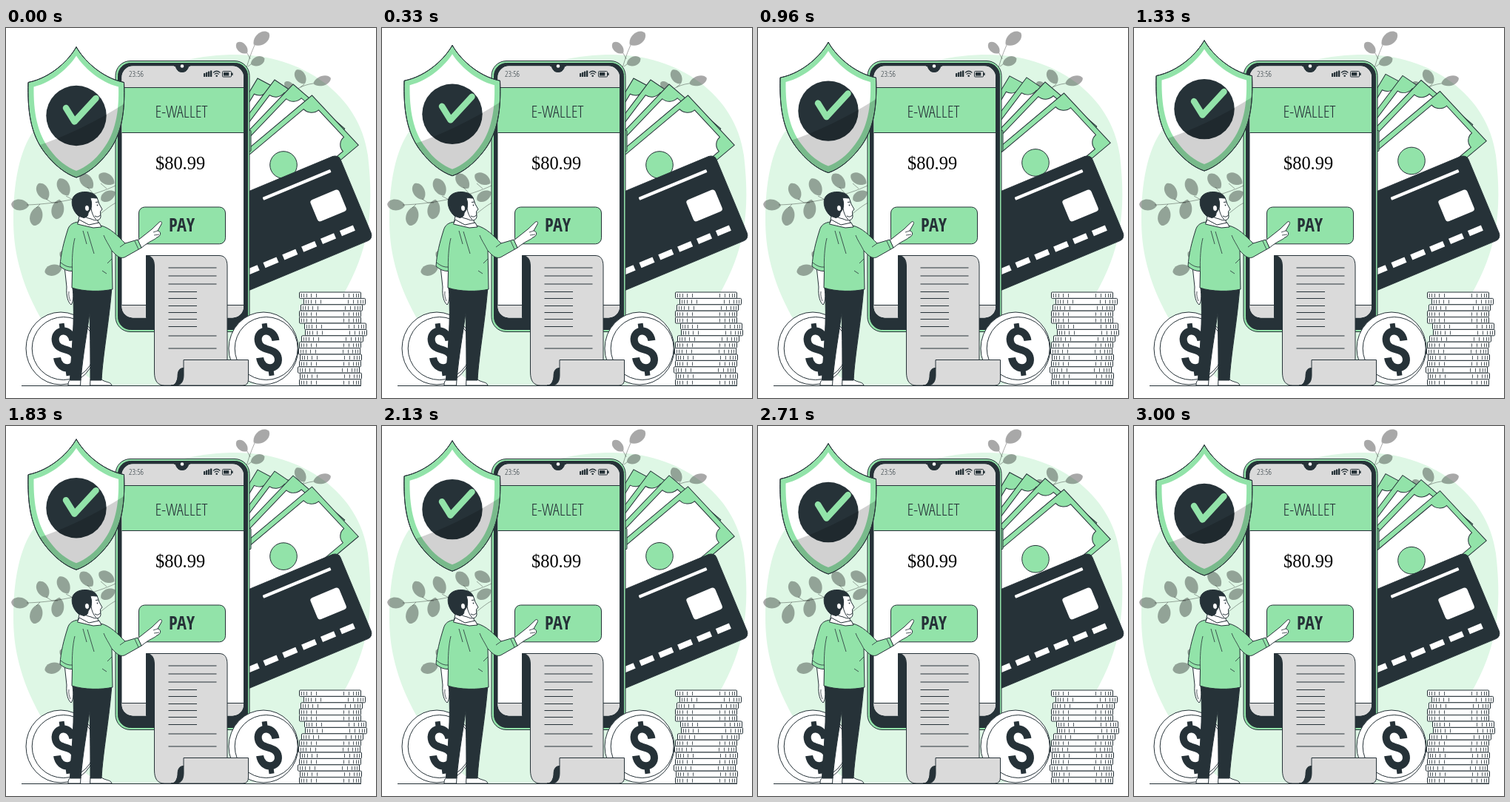
These frames come from a looping animation (500x500 px, 3.04 s). An HTML page with a canvas:

```html
<!DOCTYPE html>
<html lang="en">
<head>
<meta charset="utf-8">
<title>E-Wallet</title>
<style>
html, body { margin: 0; width: 100%; height: 100%; overflow: hidden; background: #fff; }
canvas { display: block; width: 500px; height: 500px; }
</style>
</head>
<body>
<canvas id="stage"></canvas>
<script>
const INK = '#263238', GREEN = '#92e3a9', GRAY = '#dadada', WHITE = '#fff';
const LEAF = 'rgba(0,0,0,.34)';
const LOOP = 3040, FPS = 24;
const LIGHT = "'Open Sans Condensed Light', 'Open Sans Cond Light', 'Open Sans', 'Roboto Condensed', sans-serif";
const BOLD = "'Open Sans Condensed', 'Open Sans', 'Roboto Condensed', sans-serif";
const canvas = document.getElementById('stage');
const ratio = window.devicePixelRatio || 1;
canvas.width = canvas.height = 500 * ratio;
const c = canvas.getContext('2d');

function paint(p, fill, stroke, width = 1) {
  if (fill) { c.fillStyle = fill; c.fill(p); }
  if (stroke) { c.strokeStyle = stroke; c.lineWidth = width; c.stroke(p); }
}
function path(d, fill, stroke = INK, width = 1) {
  paint(new Path2D(d), fill, stroke, width);
}
function line(d, width = 1, color = INK) { path(d, null, color, width); }
function box(x, y, w, h, r, fill, stroke, width) {
  const p = new Path2D();
  p.roundRect(x, y, w, h, r);
  paint(p, fill, stroke, width);
}
function oval(x, y, rx, ry, fill, stroke, turn = 0) {
  const p = new Path2D();
  p.ellipse(x, y, rx, ry, turn, 0, 7);
  paint(p, fill, stroke);
}
function group(x, y, turn, body) {
  c.save();
  c.translate(x, y);
  c.rotate(turn);
  body();
  c.restore();
}
// Picks a smaller size when the face is wider than the room for it.
function label(s, x, y, face, weight, size, room) {
  const set = n => { c.font = `${weight} condensed ${n}px ${face}`; };
  set(size);
  const w = c.measureText(s).width;
  if (w > room) set(size * room / w);
  c.textAlign = 'center';
  c.fillStyle = INK;
  c.fillText(s, x, y);
}

function leaf(x, y, len, deg, wide = .62) {
  group(x, y, deg * Math.PI / 180, () => {
    const a = len / 2, b = a * wide * 1.33;
    path(`M${-a} 0C${-a * .6} ${-b} ${a * .8} ${-b} ${a} 0C${a * .8} ${b} ${-a * .6} ${b} ${-a} 0Z`, LEAF, null);
  });
}

function backdrop() {
  path('M10 258C10 210 18 165 38 138C75 105 130 95 170 75C215 45 265 36 311 36C400 36 478 90 489 172' +
    'C498 250 490 300 455 362C430 405 400 440 360 470Q345 483 330 483H130C90 465 45 400 25 345C13 310 10 285 10 258Z',
    '#def7e5', null);
  line('M150 212C120 227 70 238 28 239M41 243L46 238M70 236L62 236M54 231L62 236M81 227L90 232M110 215L118 224' +
    'M128 210L136 217M118 258C130 250 140 240 149 236M73 323C82 316 88 310 92 303', 1, LEAF);
  leaf(19, 239, 24, 185);
  leaf(41, 254, 27, 105);
  leaf(50, 221, 25, 240);
  leaf(70, 245, 27, 100);
  leaf(78, 215, 26, 242);
  leaf(109, 207, 25, 230);
  leaf(136, 204, 24, 210);
  leaf(104, 241, 25, 95);
  leaf(138, 227, 22, 150);
  leaf(64, 327, 24, 165);
  leaf(82, 309, 22, 215);
  line('M322 64C326 50 330 36 336 23M326 34L330 42M331 49L327 52M378 96C388 84 400 77 415 75M403 76L398 80', 1, LEAF);
  leaf(345, 14.5, 26, -38);
  leaf(319, 27, 20, 225);
  leaf(340, 45, 20, -22);
  leaf(398, 66, 22, 238);
  leaf(427, 71.5, 25, -18, .52);
  leaf(383, 78, 16, 215);
}

function note(x, y, deg) {
  const a = deg * Math.PI / 180, b = a + 93 * Math.PI / 180;
  c.save();
  c.transform(Math.cos(a), Math.sin(a), Math.cos(b), Math.sin(b), x, y);
  path('M0 0H92V200H0Z', GREEN);
  path('M21 7H71A14 14 0 0 0 85 21V195H7V21A14 14 0 0 0 21 7Z', WHITE);
  c.restore();
}
function notes(dy) {
  group(0, dy, 0, () => {
    note(340, 68, 28);
    note(363, 70, 34);
    note(388, 76, 40.7);
    note(413.5, 91, 47);
    oval(375, 185, 18.3, 18.3, GREEN, INK);
  });
}

function card() {
  group(449, 170.5, -.394, () => {
    box(-220, 0, 220, 123.5, 8, INK, INK);
    box(-117, 14.7, 99, 4.2, 1, WHITE);
    box(-60, 43.2, 42, 31.5, 4, WHITE);
    for (let k = 0; k < 6; k++) box(-38 - 28 * k, 96.2, 19.5, 8, 0, WHITE);
  });
}

function phone() {
  box(326, 138.5, 5, 28, 1, GREEN, INK);
  box(148, 44.5, 181, 366, 20, GREEN, INK);
  box(151.5, 47.5, 175, 360, 17, INK, INK);
  c.save();
  const screen = new Path2D();
  screen.roundRect(156.5, 51.5, 164.5, 340, 15);
  c.clip(screen);
  box(150, 50, 180, 350, 0, WHITE);
  box(150, 50, 180, 30.5, 0, GRAY);
  box(150, 80.5, 180, 61, 0, GREEN, INK);
  box(150, 374.5, 180, 30, 0, GRAY, INK);
  c.restore();
  path('M227 51C231 51 229 59.5 238 59.5C247 59.5 245 51 249 51Z', INK);
  oval(238, 51.5, 2.3, 2.3, WHITE);

  label('23:56', 176, 66, LIGHT, 300, 11.5, 20);
  for (let k = 0; k < 4; k++) box(267 + 3 * k, 61 - 1.2 * k, 2.3, 5 + 1.2 * k, .4, INK);
  line('M280 60.5Q284.7 56 289.4 60.5M281.7 62.6Q284.7 59.8 287.7 62.6', 1.2);
  oval(284.7, 64.8, 1.3, 1.3, INK);
  box(292.5, 58.5, 12, 7.5, 1, null, INK);
  box(294, 60, 7.3, 4.5, 0, INK);
  box(305, 60.5, 1.6, 3.5, .5, INK);

  label('E-WALLET', 237, 120.5, LIGHT, 300, 24.5, 71);
  c.font = "24.4px 'Liberation Serif', serif";
  c.textAlign = 'left';
  c.fillStyle = '#000';
  c.fillText('$80.99', 202, 191);
  box(179.5, 242, 117, 49.8, 8, GREEN, INK);
  label('PAY', 237.5, 275, BOLD, 700, 26, 35);
}

function shield(dy) {
  const outer = 'M95 25.5C86 42 62 67 30 73.5C29 112 33 143 52 168C65 185 80 197 95 202' +
    'C110 197 125 185 138 168C157 143 161 112 159.5 73.5C128 67 104 42 95 25.5Z';
  group(0, dy, 0, () => {
    path(outer, GREEN);
    path('M95 37.5C86 52 64 73 37.5 79.5C37 113 42 142 59 164C70 179 82 188 95 193' +
      'C108 188 120 179 131 164C148 142 153 113 152 79.5C126 73 104 52 95 37.5Z', WHITE, null);
    oval(95, 118.5, 40.7, 40.7, INK);
    c.save();
    c.clip(new Path2D(outer));
    path('M40 160C80 147 125 125 165 99V210H40Z', 'rgba(0,0,0,.18)', null);
    c.restore();
    path(outer, null);
    c.lineCap = c.lineJoin = 'round';
    line('M81 108L92.5 126.5L121.5 95', 8.5, GREEN);
    c.lineCap = 'butt';
    c.lineJoin = 'miter';
  });
}

function coin(x, y) {
  oval(x, y, 47, 49, WHITE, INK);
  oval(x + 3.7, y, 42.5, 42.5, WHITE, INK);
  group(x + 6, y + 1, -.14, () => {
    line('M12 -10C12 -29 -11.5 -29 -11.5 -13C-11.5 3 12 -2 12 14C12 30 -12.5 30 -12.5 10', 10);
    line('M0 -35V-23M0 24V36', 7);
  });
}

function stack() {
  const shift = [0, 6, 2, 0, 0, 7, 8, 3, 0, -1, 1, 0, -2, 1, 0];
  shift.forEach((s, k) => {
    const x = 396.5 + s, y = 357 + 8.4 * k;
    box(x, y, 83, 8.4, 1, WHITE, INK);
    let d = '';
    for (const e of [3, 6, 10, 16, 23]) {
      d += `M${x + e} ${y + 2}v5M${x + 83 - e} ${y + 2}v5`;
    }
    line(d, .8);
  });
}

function receipt() {
  path('M189.5 307.5H200V391.5H189.5Z', INK);
  path('M189.5 307.5H288C296 307.5 299 313 299 322V455L240 470L233 483H214C205 483 200.5 477 200.5 465V322C200.5 313 197 307.5 189.5 307.5Z', GRAY);
  path('M240 448.5H327.5V475Q327.5 483 320 483H226C233 480 231 465 240 460Z', GRAY);
  path('M240 459.5C234 459.5 232 464 232 471C232 478 229 483 223 483H229C237 483 240 477 240 469Z', INK);
  let d = '';
  for (const y of [324, 335, 346, 416, 433]) d += `M219.5 ${y}H284.5`;
  for (let k = 0; k < 6; k++) d += `M219.5 ${356.5 + Math.round(9.3 * k)}H258`;
  line(d);
}

function man() {
  // legs and shoes
  path('M87 475C84 478 84 480 84 483H100.5L101 475ZM114 475L113.5 483H143C142 478 134 479 129 475Z', WHITE);
  path('M90 350C94 395 88 440 86.5 476H101C104 440 110 410 113 385C114 420 114 450 114 476H129C131 440 139 400 143 350Z', INK);
  // resting arm
  path('M79 322L82 350C81 362 84 371 88 374C92 369 91 358 89.5 348L90 324Z', WHITE);
  line('M85 356C84 362 86 366 87 369', .8);
  // pointing arm
  path('M178 287L197 272L207 262.5C210 260 211.5 263 209.5 266L205 274C210 275 210 281 204 283C200 287 195 287 183 297Z', WHITE);
  line('M205 274L199 276M207 279L200 280', .8);
  // neck
  path('M100 250L97 264L112 270L127 268L122 256Z', WHITE);
  // shirt
  path('M98 262C90 263 85 266 83 274C78 290 74 305 73 322Q81 329 89.5 328.5L89 351C105 356.5 130 356.5 144 353L143 301' +
    'C149 307 153 312 160 310L183 297L178 286L161 291C151 281 141 270 128 267L112 268Z', GREEN);
  path('M99 259L96.5 265L118 270L129 269L126 263L112 266Z', WHITE);
  line('M89.5 328.5C89 312 90 296 93 284M143 301C139 293 134 286 132 280M161 291L154 296M104 274L109 292' +
    'M110 275L119 305M130 328L136 332M143 312L137 318M174 288L179 299M74 317Q82 324 90 323', .8);
  // head
  path('M98 240C102 226 118 224 123 229L126 238L130 245L127.5 248L128 255C127 261 121 261 115 258C104 256 97 248 98 240Z', WHITE);
  path('M98 254C92 249 88 240 89.5 232C91 225 99 221 108 221.5C116 222 122 225 123 230C119 230 117 229 114 230' +
    'C116 235 116 239 115 244L111 250C111 254 109 256 105 256.5Z', INK);
  oval(109.5, 243.5, 3, 4, WHITE, INK, -.2);
  line('M121 235.5L125 235M115 244C116 250 118 255 122 259M120 254Q125 257 128 252', 1);
  oval(123.5, 239.5, .8, 1.1, INK);
}

// A linear rise and fall over three seconds.
function float(sec, delay) {
  const u = Math.max(0, sec - delay) % 3 / 1.5;
  return -10 * (u < 1 ? u : 2 - u);
}

function draw(sec) {
  c.setTransform(ratio, 0, 0, ratio, 0, 0);
  c.clearRect(0, 0, 500, 500);
  backdrop();
  notes(float(sec, .5));
  card();
  phone();
  shield(float(sec, 0));
  line('M21 483.5H480');
  coin(74, 433);
  coin(348, 433);
  stack();
  receipt();
  man();
}

let shown = -1;
const start = performance.now();
function tick() {
  const t = Math.floor((performance.now() - start) % LOOP / 10) * 10;
  const step = Math.ceil((t + 5) * FPS / 1000) - 1;
  if (step !== shown) {
    shown = step;
    draw(step / FPS);
  }
  requestAnimationFrame(tick);
}
tick();
</script>
</body>
</html>
```
